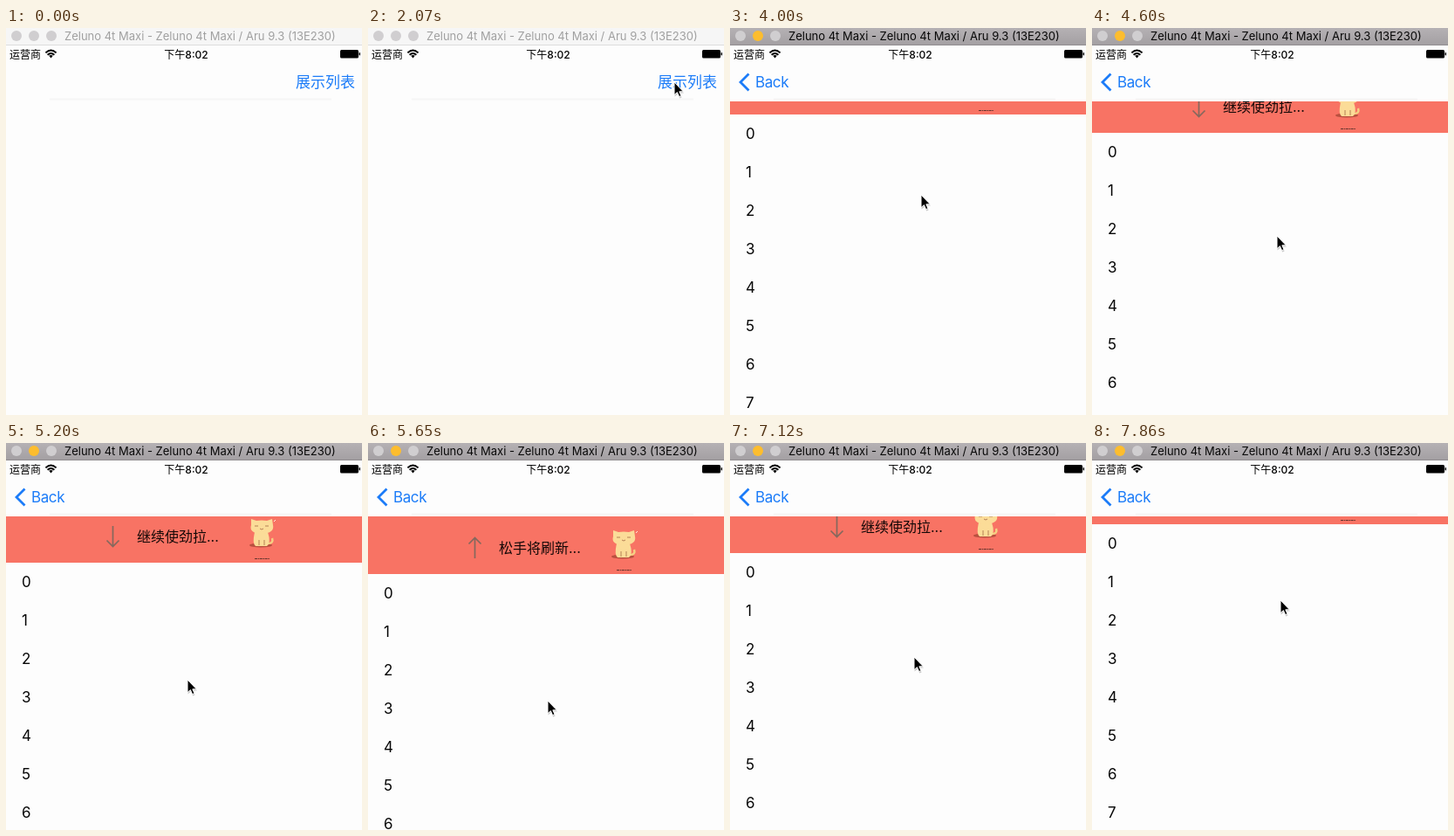
An HTML page that plays this animation: 408x443 px, repeating every 8000 ms.

```html
<!DOCTYPE html>
<html lang="zh-CN">
<head>
<meta charset="utf-8">
<title>Pull to refresh</title>
<style>
  html, body { margin: 0; width: 100%; height: 100%; overflow: hidden; background: #fdfdfd; }
  svg { display: block; width: 408px; height: 443px; }
  text { font-family: Inter, "Noto Sans CJK SC", "Noto Sans CJK", sans-serif; white-space: pre; }
  .title { font-size: 13px; }
  .status { font-size: 12px; }
  .nav { font-size: 17px; fill: #1c7cf8; }
  .row { font-size: 17px; fill: #050505; }
  .hint { font-size: 16px; fill: #140807; }
</style>
</head>
<body>
<svg viewBox="0 0 408 443">
  <defs>
    <linearGradient id="chrome" x2="0" y2="1">
      <stop stop-color="#b5b1b4"/><stop offset="1" stop-color="#a39fa2"/>
    </linearGradient>
    <clipPath id="below"><path d="M0 84H408V443H0Z"/></clipPath>
  </defs>
  <rect width="408" height="443" fill="#fdfdfd"/>

  <g clip-path="url(#below)">
    <g id="list">
      <g id="rows"></g>
      <!-- header: its bottom edge is y = 84 when the list is at rest -->
      <rect y="-16" width="408" height="100" fill="#f87364"/>
      <g id="arrow" fill="none" stroke="#85685d" stroke-width="1.7">
        <path d="M0 -12V11M-7 4.5L0 11.5L7 4.5"/>
      </g>
      <text id="hint" class="hint" x="150" y="60"></text>
      <g id="cat" transform="translate(293 84)">
        <ellipse cx="-1" cy="-20" rx="13" ry="2.6" fill="#b9503f"/>
        <path d="M7 -22Q14 -22 12 -28" fill="none" stroke="#f4cf83" stroke-width="2.5"/>
        <path d="M-8 -35Q-11 -22 -7 -19H6Q11 -23 7 -35Z" fill="#fbdc98"/>
        <path d="M-12 -43L-12 -50L-6 -48Q0 -49 6 -48L12 -50L13 -43Q15 -34 0 -33Q-15 -34 -12 -43Z" fill="#fbdc98"/>
        <path d="M-8 -42h4M4 -42h4M-2 -39q2 2 4 0M-3 -26v6M3 -26v6" fill="none" stroke="#ad7650" stroke-width=".9"/>
        <path d="M14 -47l2 -2" stroke="#fff0df"/>
        <path d="M-8 -4.5H9" stroke="#63342d" stroke-width="1.2" stroke-dasharray="3 .7 1.5 .6"/>
      </g>
    </g>
  </g>

  <path d="M50 81.5H373" stroke="#f6f6f6" stroke-width="2"/>
  <text id="show" class="nav" x="332" y="68.3">展示列表</text>
  <g id="back">
    <path d="M21.5 52.5L12 62L21.5 71.5" fill="none" stroke="#1c7cf8" stroke-width="2.8"/>
    <text id="backText" class="nav" x="29" y="68" letter-spacing="-.4">Back</text>
  </g>

  <text class="status" x="4" y="34.5">运营商</text>
  <g fill="none" stroke="#000" stroke-width="1.9">
    <path d="M45.4 28.4Q51.5 22.7 57.6 28.4M47.6 30.8Q51.5 27.2 55.4 30.8"/>
    <path d="M49.2 31.8Q51.5 30 53.8 31.8L51.5 34.4Z" fill="#000" stroke="none"/>
  </g>
  <text class="status" x="206.5" y="34.5" text-anchor="middle" font-weight="500">下午8:02</text>
  <rect x="383" y="25" width="21" height="9.5" rx="1.5"/>
  <rect x="404.6" y="28" width="1.4" height="3.5" rx=".7"/>

  <rect id="bar" width="408" height="20"/>
  <path id="edge" d="M0 19.5H408"/>
  <circle cx="12" cy="9" r="6" fill="#d0ced0"/>
  <circle id="light" cx="32" cy="9" r="6"/>
  <circle cx="52" cy="9" r="6" fill="#d0ced0"/>
  <text id="title" class="title" x="67" y="14">Zeluno 4t Maxi - Zeluno 4t Maxi / Aru 9.3 (13E230)</text>

  <g id="cursor">
    <path d="M.5 1.5V16.5L4 13.4L6.2 18.4L8.6 17.4L6.4 12.6H11Z" fill="#0003"/>
    <path d="M0 0V14.6L3.4 11.6L5.6 16.6L8 15.6L5.8 10.8H10.4Z" stroke="#fff"/>
  </g>
</svg>
<script>
const $ = id => document.getElementById(id);
const LOOP = 8000, STEP = 148.2, LEAD = 12;

// Keys are [step, value], linear in between.
const pull = [[24, 0], [31, 36], [35, 53], [37, 62], [40, 73], [41, 74], [42, 74], [43, 72], [45, 63], [50, 28], [53, 9]];
const turn = [[36, 0], [38, 180], [45, 180], [47, 0]];
const push = [[16, 0], [17, .4], [18, .82], [19, .97], [20, 1]];
const mouseX = [[9, 201], [11, 268], [14, 351], [17, 351], [21, 225], [24, 225], [31, 212], [35, 208], [40, 205], [43, 205], [53, 216]];
const mouseY = [[9, 303], [11, 197], [14, 62], [17, 62], [21, 156], [24, 156], [31, 238], [35, 271], [40, 311], [42, 313], [43, 309], [53, 180]];

function at(keys, s) {
  const n = keys.findIndex(k => k[0] >= s);
  if (n < 0) return keys[keys.length - 1][1];
  if (n === 0) return keys[0][1];
  const [a, u] = keys[n - 1], [b, v] = keys[n];
  return u + (v - u) * (s - a) / (b - a);
}

const set = (id, attrs) => {
  for (const name in attrs) $(id).setAttribute(name, attrs[name]);
};

for (let i = 0; i < 9; i++) {
  $('rows').innerHTML += `<text class="row" x="18" y="${112 + 44 * i}">${i}</text>`;
}

function draw(ms) {
  const s = Math.floor((ms % LOOP + LEAD) / STEP);
  const active = s >= 16, p = at(push, s), off = Math.round(at(pull, s));

  set('bar', { fill: active ? 'url(#chrome)' : '#f6f6f6' });
  set('edge', { stroke: active ? '#918d90' : '#dcdcdc' });
  set('light', { fill: active ? '#fdbd2e' : '#d0ced0' });
  set('title', { fill: active ? '#080808' : '#a0a0a0' });

  set('show', { opacity: 1 - p });
  set('back', { opacity: p });
  set('backText', { x: 29 + 150 * (1 - p) });

  set('list', { transform: `translate(${408 * (1 - p)} ${off})` });
  set('arrow', { transform: `translate(122.5 54) rotate(${at(turn, s)})` });
  $('hint').textContent = off >= 60 ? '松手将刷新...' : '继续使劲拉...';

  set('cursor', {
    transform: `translate(${Math.round(at(mouseX, s))} ${Math.round(at(mouseY, s))})`,
    visibility: s < 9 ? 'hidden' : 'visible'
  });
}

const start = performance.now();
function tick() {
  draw(performance.now() - start);
  requestAnimationFrame(tick);
}
tick();
</script>
</body>
</html>
```
